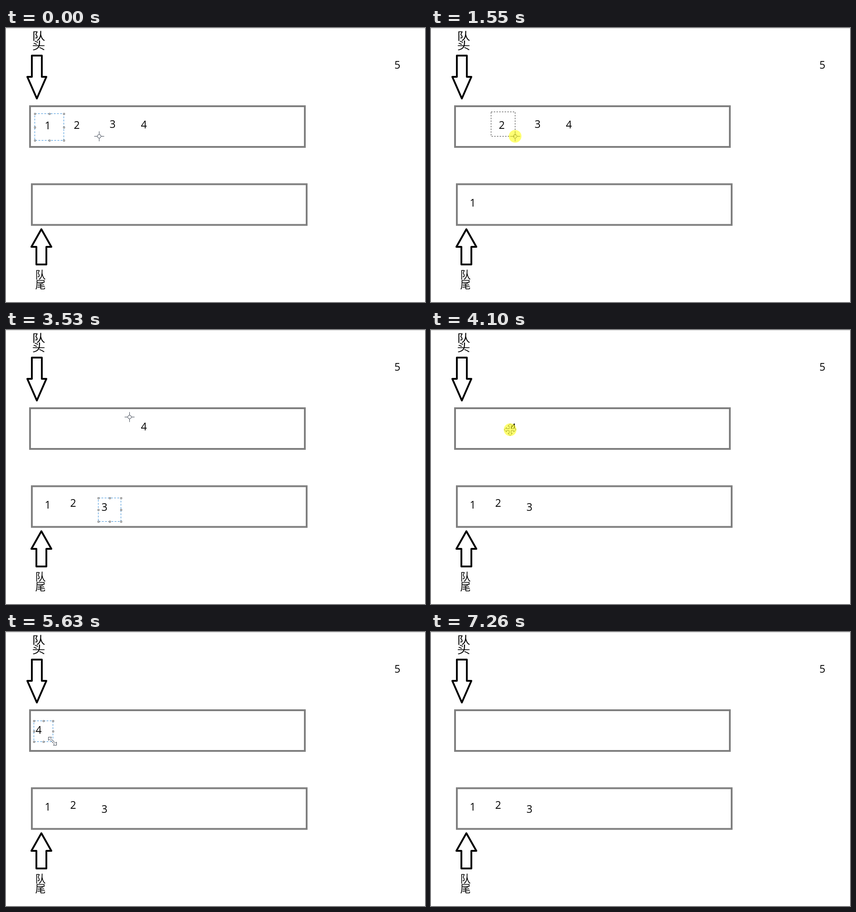
An HTML page that plays this animation: 924 by 606 pixels, repeating every 8210 ms.

```html
<!DOCTYPE html>
<html lang="zh">
<head>
<meta charset="utf-8">
<title>Queue with two stacks</title>
<style>
html, body { margin: 0; width: 100%; height: 100%; overflow: hidden; background: #fff; }
svg { display: block; width: 924px; height: 606px; }
text { text-anchor: middle; fill: #000; }
.num { font: 23px "Open Sans", "Noto Sans", sans-serif; }
.han { font: 23px "Noto Sans CJK SC", "Noto Sans CJK", sans-serif; }
.tray { fill: none; stroke: #7f7f7f; stroke-width: 4; }
.arrow { fill: none; stroke: #000; stroke-width: 4; stroke-linejoin: round; }
.cur { fill: none; stroke: #3a4250; }
.solid { fill: #fff; }
#marquee { fill: none; stroke: #222; stroke-dasharray: 3 3; }
#frame { fill: none; stroke: #2f8ad8; stroke-dasharray: 4 3; }
.grip { fill: #fff; stroke: #666; }
</style>
</head>
<body>
<svg viewBox="0 0 924 606">
  <rect width="924" height="1" fill="#d0d0d0"/>
  <g class="han">
    <g transform="translate(72 0) scale(1.26 1)"><text y="25.5">队</text><text y="47">头</text></g>
    <text x="76" y="554">队</text><text x="76" y="576">尾</text>
  </g>
  <path class="arrow" d="M57 61H79V108H89L68 156L47 108H57Z"/>
  <path class="arrow" d="M78 445L100 484H89V523H67V484H56Z"/>
  <rect class="tray" x="53" y="173" width="606" height="90"/>
  <rect class="tray" x="57" y="345.5" width="606" height="90"/>
  <g id="nums" class="num"></g>
  <rect id="marquee"/>
  <g id="sel"><rect id="frame"/></g>
  <g id="cursor">
    <g id="cross" class="cur"><circle r="4"/><path d="M-11 0H-4M4 0H11M0-11V-4M0 4V11"/></g>
    <g id="move"></g>
    <path id="size" class="cur solid" d="M-9-9H-2L-4-6L6 4L9 2V9H2L4 6L-6-4L-9-2Z"/>
    <circle id="press" r="14" fill="#ff0" opacity=".55"/>
  </g>
</svg>
<script>
const LOOP = 8210;
const $ = id => document.getElementById(id);
const set = (el, attrs) => { for (const k in attrs) el.setAttribute(k, attrs[k]); };
const add = (parent, tag, attrs) => {
  const el = document.createElementNS('http://www.w3.org/2000/svg', tag);
  set(el, attrs);
  return parent.appendChild(el);
};
const show = (el, on) => { el.style.display = on ? '' : 'none'; };
const shift = (el, x, y) => set(el, { transform: `translate(${x} ${y})` });
const within = (t, a, b) => t >= a && t < b;
const snap = v => Math.round(v) + .5;

// Each digit is outlined, grabbed at (gx, gy) and dragged by (dx, dy)
const pick = (n, box, times, grip) => {
  const [x, y, w, h] = box, [from, ready, grab, drop, clear] = times, [gx, gy, dx, dy] = grip;
  return { n, x, y, w, h, from, ready, grab, drop, clear, gx, gy, dx, dy };
};
const picks = [
  pick(0, [63, 189, 64, 59], [0, 0, 430, 1030, 1290], [93, 216, 0, 171]),
  pick(1, [132, 185, 53, 54], [1290, 1590, 1940, 2280, 2440], [158, 234, -8, 168]),
  pick(2, [221, 192, 50, 52], [2440, 2590, 2850, 3290, 3550], [245, 225, -18, 179]),
  pick(3, [272, 191, 91, 54], [3550, 3800, 3950, 4290, 4780], [297, 218, -232, 3]),
  pick(3, [61, 196, 42, 46], [5240, 5590, 6000, 6700, 6700], [79, 223, 156, -241])
];

// Free pointer moves between the drags: time, x, y
const stops = [
  [0, 205, 239], [100, 205, 239], [1680, 193, 236], [2690, 270, 243],
  [4530, 180, 272], [4760, 313, 218], [4870, 313, 218], [5130, 75, 205],
  [6270, 93, 212], [6450, 160, 150], [6600, 205, 68],
  [6899, 235, -18], [6900, 890, 31], [7250, 450, 590], [7260, 450, 640]
].map(([t, x, y]) => ({ t, x, y, steady: true }));

for (const p of picks) {
  const hold = (a, b, x, y) => stops.push({ t: a, x, y }, { t: b, x, y });
  if (p.ready > p.from) {
    hold(p.from - 10, p.from + 10, p.x, p.y);
    hold(p.ready - 40, p.ready, p.x + p.w, p.y + p.h);
  }
  hold(p.grab - 50, p.grab, p.gx, p.gy);
  hold(p.drop - 50, p.drop, p.gx + p.dx, p.gy + p.dy);
}
stops.sort((a, b) => a.t - b.t);

const digits = [[92, 216], [156, 215], [235, 213], [304, 214], [863, 82]];
const labels = digits.map(([x, y], i) => {
  const el = add($('nums'), 'text', { x, y: y + 8 });
  el.textContent = i + 1;
  return el;
});

const grips = [];
for (let i = 0; i < 9; i++) if (i !== 4) {
  const el = add($('sel'), 'rect', { class: 'grip', width: 3, height: 3 });
  grips.push({ u: i % 3 / 2, v: Math.floor(i / 3) / 2, el });
}

// One arm of the four-way arrow, turned three times
let arms = '';
const arm = [[-2, -2], [-2, -8], [-5, -8], [0, -13], [5, -8], [2, -8]];
for (let i = 0; i < 4; i++) {
  const c = [1, 0, -1, 0][i], s = [0, 1, 0, -1][i];
  arms += arm.map(([x, y]) => `${x * c - y * s},${x * s + y * c} `).join('');
}
add($('move'), 'polygon', { class: 'cur solid', points: arms });

function pointer(t) {
  const i = stops.findIndex(s => s.t > t);
  if (i < 0) return [stops[stops.length - 1].x, stops[stops.length - 1].y];
  const a = stops[i - 1], b = stops[i];
  let k = (t - a.t) / (b.t - a.t);
  if (!b.steady) k = k * k * (3 - 2 * k);
  return [a.x + (b.x - a.x) * k, a.y + (b.y - a.y) * k];
}

function dragged(p, t) {
  if (t < p.grab) return [0, 0];
  if (t >= p.drop) return [p.dx, p.dy];
  const [x, y] = pointer(t);
  return [x - p.gx, y - p.gy];
}

function outline(x, y, width, height) {
  set($('frame'), { x: snap(x), y: snap(y), width, height });
  for (const { u, v, el } of grips) {
    set(el, { x: snap(x + u * width) - 1, y: snap(y + v * height) - 1 });
  }
}

function draw(t) {
  const [cx, cy] = pointer(t);
  const offsets = digits.map(() => [0, 0]);
  let shape = 'cross', outlined = false, marking = false, pressed = within(t, 4780, 4860);

  for (const p of picks) {
    const [dx, dy] = dragged(p, t);
    offsets[p.n][0] += dx;
    offsets[p.n][1] += dy;
    if (!within(t, p.from, p.clear)) continue;
    if (t < p.ready) {
      marking = pressed = true;
      set($('marquee'), {
        x: p.x + .5, y: p.y + .5,
        width: Math.max(0, Math.round(cx - p.x)),
        height: Math.max(0, Math.round(cy - p.y))
      });
    } else if (within(t, p.grab, p.drop)) {
      pressed = true;
      shape = 'move';
    } else {
      outlined = true;
      const x = p.x + dx, y = p.y + dy, right = x + p.w, bottom = y + p.h;
      outline(x, y, p.w, p.h);
      if (Math.hypot(cx - right, cy - bottom) < 4) shape = 'size';
      else if (within(cx, x, right) && within(cy, y, bottom)) shape = 'move';
    }
  }

  labels.forEach((el, i) => shift(el, ...offsets[i].map(Math.round)));
  show(labels[3], t < 6700);
  show($('marquee'), marking);
  show($('sel'), outlined);
  for (const id of ['cross', 'move', 'size']) show($(id), id === shape);
  show($('press'), pressed);
  shift($('cursor'), snap(cx), snap(cy));
}

const start = performance.now();
function tick() {
  draw((performance.now() - start) % LOOP);
  requestAnimationFrame(tick);
}
tick();
</script>
</body>
</html>
```
